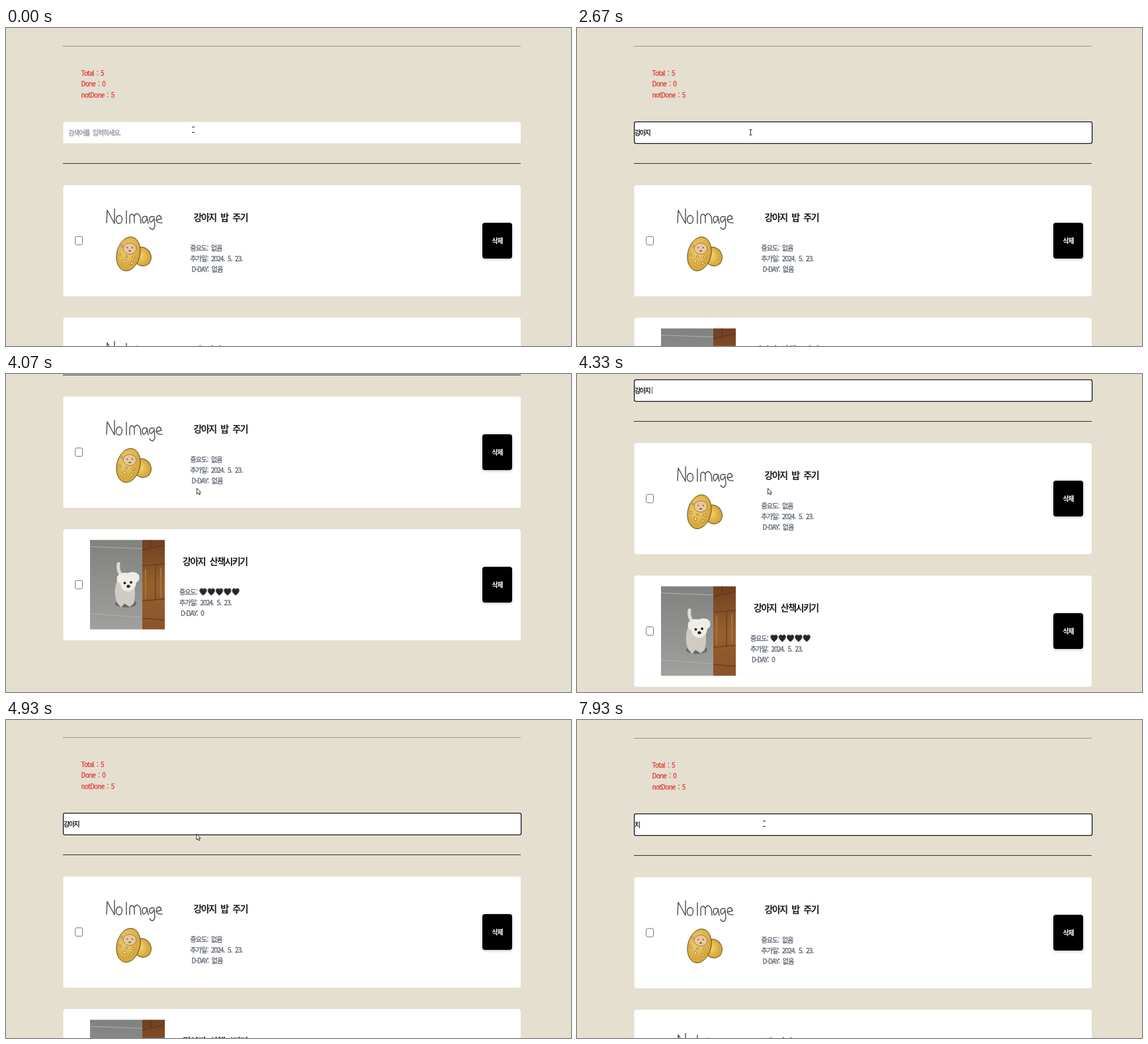
An HTML page that plays this animation: 854 px wide and 480 px high, repeating every 8000 ms.

```html
<!DOCTYPE html>
<html lang="ko">
<head>
<meta charset="utf-8">
<style>
  html, body { margin: 0; width: 100%; height: 100%; overflow: hidden; background: #e4dfcf; }
  svg { display: block; }
  text { font: 500 10px "Noto Sans CJK KR", "Noto Sans CJK", sans-serif; white-space: pre; stroke-width: .3; }
  .stat { fill: #e2423c; stroke: #e2423c; letter-spacing: -.75px; word-spacing: 2px; }
  .title { font-size: 14px; font-weight: 700; fill: #212126; letter-spacing: -1.5px; word-spacing: 4.2px; }
  .info { fill: #5f6674; stroke: #5f6674; letter-spacing: -.9px; word-spacing: 2.7px; }
  .field { fill: #15151a; stroke: #15151a; letter-spacing: -1.4px; }
  .hint { fill: #9097a3; stroke: #9097a3; letter-spacing: -1.1px; word-spacing: 2.7px; }
  .del { fill: #fff; font-weight: 700; letter-spacing: -1.2px; }
  .btn { filter: drop-shadow(0 1px 2px #0004); }
  .pen { fill: none; stroke: #4c4c4c; stroke-width: 1.4; stroke-linecap: round; stroke-linejoin: round; }
  .potato { fill: url(#skin); stroke: #5a4720; stroke-width: .9; }
</style>
</head>
<body>
<svg width="854" height="480" viewBox="0 0 854 480">
  <defs>
    <radialGradient id="skin" cx=".4" cy=".4">
      <stop offset=".2" stop-color="#f0cc68"/><stop offset="1" stop-color="#d8a83c"/>
    </radialGradient>
    <linearGradient id="mat" x2="0" y2="1">
      <stop stop-color="#80827f"/><stop offset="1" stop-color="#a0a19e"/>
    </linearGradient>
    <linearGradient id="wood" x2="0" y2="1">
      <stop stop-color="#6f4020"/><stop offset=".5" stop-color="#96602f"/><stop offset="1" stop-color="#8a532b"/>
    </linearGradient>

    <g id="noImage">
      <path class="pen" d="M152 294L153 275L164 295V273 M171 283C165 284 165 295 171 295S177 283 171 283
        M182 276V295 M187 295V284Q190 278 194 284V294M194 284Q198 276 203 285L204 295
        M213 285Q206 282 206 290Q208 299 213 288V285L215 295
        M224 285Q216 283 217 290Q219 297 224 287L225 299Q222 308 217 301
        M227 290L235 288Q233 280 228 285Q225 295 236 294"/>
      <ellipse class="potato" cx="206" cy="345" rx="13" ry="14.5" transform="rotate(-30 206 345)"/>
      <ellipse class="potato" cx="185" cy="341" rx="17.5" ry="26" transform="rotate(14 185 341)"/>
      <ellipse cx="187" cy="333" rx="10" ry="8.5" fill="#e9c69c" stroke="#8c6a35" stroke-width=".8"/>
      <path d="M182.5 331.500h1.500M190 331.500h1.500M185.500 336.500h3" stroke="#3b2c18" stroke-width="1.400"/>
      <g fill="#f3e3bd" stroke="#8c6a35" stroke-width=".8">
        <circle cx="172" cy="342" r="1.800"/><circle cx="179" cy="352" r="2.200"/>
        <circle cx="190" cy="355" r="2"/><circle cx="193" cy="346" r="1.800"/>
        <circle cx="175" cy="329" r="1.500"/><circle cx="182" cy="345" r="1.500"/>
      </g>
    </g>

    <g id="photo" transform="translate(127 253.500)">
      <path fill="url(#mat)" d="M0 0H79V135H0z"/>
      <path fill="url(#wood)" d="M79 0H113V135H79z"/>
      <path fill="none" stroke="#b0b1ae" d="M0 10L79 13M0 111L79 117"/>
      <path fill="none" stroke="#5c3316" d="M79 15L113 8M79 39L113 36M79 92L113 89M79 118L113 121M99 38V91M92 0V12"/>
      <path fill="none" stroke="#ac7339" stroke-width="2" d="M84 44V88M107 42V86"/>
      <ellipse cx="54" cy="96" rx="16" ry="6" fill="#686967"/>
      <path fill="none" stroke="#dedbd4" stroke-width="5" stroke-linecap="round" d="M43 36Q41 46 48 54"/>
      <path fill="#d0ccc4" d="M42 58Q34 78 41 95L47 102L52 96L60 101L66 96Q70 80 66 62z"/>
      <path fill="#f0ede6" d="M41 55Q47 48 57 50Q68 46 74 53Q76 62 70 64Q69 76 58 78Q47 77 46 66Q39 64 41 55z"/>
      <g fill="#25211f"><circle cx="52.500" cy="65" r="1.900"/><circle cx="62" cy="64" r="1.900"/><ellipse cx="58" cy="70" rx="2.700" ry="2.200"/></g>
    </g>

    <path id="heart" d="M0 5C-9 -1 -4.500 -8 0 -4C4.500 -8 9 -1 0 5z" fill="#26262a" stroke="#55565c"/>
    <g id="beam" fill="none" stroke="#333"><path d="M-2 -4H2M-2 4H2"/><path d="M0 -4V4"/></g>
    <path id="faint" fill="none" stroke="#999" d="M-2 -4H2M-2 4H2M0 -4V4"/>
    <path id="dashes" fill="none" stroke="#222" d="M-2 -4H2M-2 4H2"/>
    <path id="arrow" d="M0 0V9L2 7L3.500 10L5 9.300L3.700 6.500H6z" fill="#fff" stroke="#222" stroke-width=".9"/>
  </defs>

  <g id="page">
    <path d="M86 27.500H778" stroke="#98958b"/>
    <text class="stat" x="113.500" y="72">Total : 5</text>
    <text class="stat" x="113.500" y="88.300">Done : 0</text>
    <text class="stat" x="113.500" y="104.500">notDone : 5</text>
    <rect x="86.500" y="141.700" width="691.500" height="32.300" rx="2.500" fill="#fff"/>
    <rect id="ring" x="86.600" y="141.600" width="692" height="32.700" rx="2.500" fill="#fff" stroke="#15171c" stroke-width="1.300"/>
    <text id="hint" class="field hint" x="94" y="161.500">검색어를 입력하세요.</text>
    <text id="typed" class="field" x="87" y="161.500"></text>
    <path id="caret" d="M113.500 152.500V163" stroke="#555"/>
    <path d="M86 204.500H778" stroke="#34332f"/>
    <g id="cards"></g>
  </g>
  <use id="cursor"/>
</svg>

<script>
const LOOP = 8000;
const $ = id => document.getElementById(id);

function card(id, dy, art, title, x, info, hearts = 0) {
  const lines = info.map((s, i) =>
    `<text class="info" x="${x - (i < 2 ? 5 : 3)}" y="${335.5 + 16.2 * i}">${s}</text>`).join('');
  const row = Array.from({ length: hearts }, (_, i) =>
    `<use href="#heart" x="${298 + 12.3 * i}" y="332"/>`).join('');
  return `<g id="${id}" transform="translate(0 ${dy})">
    <rect x="86.500" y="237.300" width="691.500" height="167.700" rx="3.500" fill="#fff"/>
    <rect x="104.700" y="314.700" width="10.800" height="12.600" rx="2" fill="#fff" stroke="#767676"/>
    <use href="#${art}"/>
    <text class="title" x="${x}" y="291.300">${title}</text>${lines}${row}
    <rect class="btn" x="720" y="294" width="45" height="54" rx="4"/>
    <text class="del" x="734.500" y="324.700">삭제</text></g>`;
}

const added = '추가일: 2024. 5. 23.';
const plain = ['중요도: 없음', added, 'D-DAY: 없음'];
$('cards').innerHTML =
  card('first', 0, 'noImage', '강아지 밥 주기', 283.5, plain) +
  card('other', 200, 'noImage', '밥 먹기', 283.5, plain) +
  card('walk', 200, 'photo', '강아지 산책시키기', 267, ['중요도:', added, 'D-DAY: 0'], 5);

// Each track lists [start time, value...]; values hold until the next entry.
const typing = [[0, ''], [1270, 'ㄱ'], [1400, '가'], [1530, '강'], [1670, '강ㅇ'], [1730, '강아'],
  [1870, '강앚'], [1930, '강아지'], [6400, '강아'], [6530, '강'], [6670, ''], [7930, '치']];
const scroll = [[0, 0], [3470, 18], [3530, 66], [3600, 115], [3670, 157], [3730, 187], [3800, 203],
  [4130, 196], [4200, 180], [4270, 158], [4330, 133], [4400, 107], [4470, 83], [4530, 68],
  [4730, 44], [4800, 19], [4870, 5], [4930, 1], [5000, 0]];
const caret = [[0, 0], [2130, 1], [2670, 0], [3200, 1], [3730, 0], [4270, 1], [4800, 0],
  [5330, 1], [5800, 0]];
const pointer = [[0, 'dashes', 283, 153.5], [130, 'dashes', 277, 155.5], [200, 'beam', 268, 157.5],
  [270, 'beam', 262.5, 157.5], [4070, 'arrow', 288.5, 172.5], [4470, 'faint', 291.5, 178.5],
  [4800, 'arrow', 288, 172], [5000, 'beam', 285, 164.5], [5070, 'dashes', 283, 156.5]];

const at = (track, t) => track.findLast(step => step[0] <= t);
const show = (id, on) => $(id).setAttribute('visibility', on ? 'visible' : 'hidden');

function draw(now) {
  const t = now % LOOP;
  const word = at(typing, t)[1];
  const filtered = t >= 2400 && t < 6670;
  const [, shape, x, y] = at(pointer, t);

  $('page').setAttribute('transform', `translate(0 ${-at(scroll, t)[1]})`);
  $('typed').textContent = word;
  show('hint', !word);
  show('ring', t >= 470);
  show('caret', at(caret, t)[1]);
  show('walk', filtered);
  show('other', !filtered);
  $('cursor').setAttribute('href', '#' + shape);
  $('cursor').setAttribute('transform', `translate(${x} ${y})`);
}

const start = performance.now();
function tick() {
  draw(performance.now() - start);
  requestAnimationFrame(tick);
}
tick();
</script>
</body>
</html>
```
